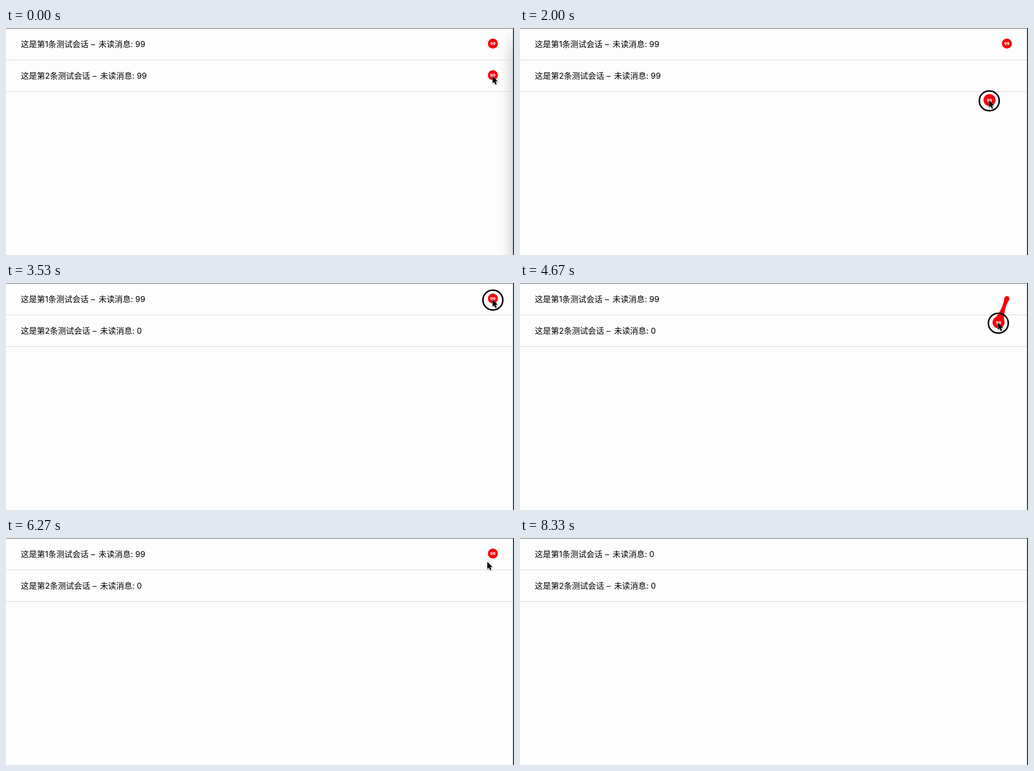
These frames come from a looping animation (1010x452 px, 8.59 s). An HTML page:

```html
<!DOCTYPE html>
<html lang="zh">
<head>
<meta charset="utf-8">
<style>
  html, body { margin: 0; width: 100%; height: 100%; overflow: hidden; background: #fdfdfd; }
  svg { display: block; }
  .title { font: 16px Inter, "Noto Sans CJK SC", "Noto Sans CJK", sans-serif; fill: #000; }
  .count { font: bold 9px "Open Sans", sans-serif; fill: #fff; text-anchor: middle; }
  .red { fill: #f6000a; }
  #cursor { filter: drop-shadow(0 1px 1px rgba(0, 0, 0, .4)); }
</style>
</head>
<body>
<svg width="1010" height="452" viewBox="0 0 1010 452">
  <defs>
    <linearGradient id="fade">
      <stop offset="0" stop-color="#000" stop-opacity="0"/>
      <stop offset=".5" stop-color="#000" stop-opacity=".025"/>
      <stop offset="1" stop-color="#000" stop-opacity=".12"/>
    </linearGradient>
    <linearGradient id="fadeTop" x2="0" y2="1">
      <stop offset="0" stop-color="#000"/>
      <stop offset=".12" stop-color="#fff"/>
    </linearGradient>
    <mask id="shadeMask"><rect x="970" width="40" height="452" fill="url(#fadeTop)"/></mask>
  </defs>
  <rect width="1010" height="452" fill="#fdfdfd"/>
  <rect id="shade" x="974" width="34" height="452" fill="url(#fade)" mask="url(#shadeMask)"/>
  <path d="M0 63.5H1008M0 126.5H1008" stroke="#d6d6d6"/>
  <path d="M0 .5H1010" stroke="#555"/>
  <rect x="1008" width="2" height="452" fill="#333"/>
  <g id="rows"></g>
  <circle id="ring" r="19.8" fill="none" stroke="#000" stroke-width="3"/>
  <path id="cursor" d="M-.5-1V13L2.7 10.2 5 15.4 7.4 14.4 5.2 9.3H9.6Z" fill="#000" stroke="#fff" stroke-width="1" paint-order="stroke"/>
</svg>
<script>
const LOOP = 8590, FPS = 15, SNAP = 60, HOME_X = 968;
const NS = "http://www.w3.org/2000/svg";
const $ = id => document.getElementById(id);

// Pointer path: step, x, y
const path = [
  [0, 968, 97], [4, 968, 97], [7, 962, 103], [10, 968, 98], [16, 969, 98], [18, 969, 98],
  [26, 945.5, 134.5], [30, 933, 145], [37, 831, 225.5], [42, 831, 225.5],
  [51, 968, 34], [53, 968, 34], [64, 951, 68], [70, 951, 80], [73, 946, 87], [76, 922, 70],
  [79, 926.5, 50], [81, 940, 50], [91, 957.5, 48.5], [94, 957.5, 48.5],
  [96, 968, 36], [100, 773, 160], [103, 976, 40], [105, 970, 34], [107, 981, 38],
  [109, 970, 34], [114, 930, 140], [121, 965, 400], [124, 974, 440], [125, 980, 475]
];

const rows = [
  { y: 31, shift: 0, drags: [[53, 80], [96, 104], [109, 114]] },
  { y: 94, shift: 3, drags: [[4, 10], [18, 42]] }
];

function add(parent, tag, attrs, text = "") {
  const el = document.createElementNS(NS, tag);
  for (const key in attrs) el.setAttribute(key, attrs[key]);
  el.textContent = text;
  return parent.appendChild(el);
}

rows.forEach((row, i) => {
  const label = (x, text) => add($("rows"), "text", { class: "title", x, y: row.y + 7 }, text);
  label(29.5, `这是第${i + 1}条测试会话`);
  label(169 + row.shift, "–");
  row.unread = label(184 + row.shift, "");
});
rows.forEach(row => {
  row.badge = add($("rows"), "g", {});
  row.tail = add(row.badge, "circle", { class: "red", cx: HOME_X, cy: row.y });
  row.neck = add(row.badge, "path", { class: "red" });
  row.dot = add(row.badge, "circle", { class: "red" });
  row.count = add(row.badge, "text", { class: "count" }, "99");
});

function pointer(step) {
  const next = path.findIndex(p => p[0] > step);
  if (next < 0) return path[path.length - 1].slice(1);
  const [s0, x0, y0] = path[next - 1], [s1, x1, y1] = path[next];
  const k = (step - s0) / (s1 - s0);
  return [x0 + (x1 - x0) * k, y0 + (y1 - y0) * k];
}

// Offset of the badge from its resting place while held at a step
function pull(row, step) {
  const [x, y] = pointer(step);
  return [x + .5 - HOME_X, y - 1.5 - row.y];
}

function badgeState(row, step) {
  const state = { dx: 0, dy: 0, held: false, popped: false };
  for (const [press, release] of row.drags) {
    if (step < press) continue;
    if (step < release) {
      [state.dx, state.dy] = pull(row, step);
      state.held = true;
      continue;
    }
    const [dx, dy] = pull(row, release - 1);
    if (press !== 96 && Math.hypot(dx, dy) > SNAP) state.popped = true;
    const age = step - release;
    const swing = age < 8 ? Math.exp(-.5 * age) * Math.cos(1.5 * age) : 0;
    state.dx = dx * swing;
    state.dy = dy * swing;
  }
  return state;
}

function neckPath(x0, y0, r0, x1, y1, r1) {
  const d = Math.hypot(x1 - x0, y1 - y0);
  const nx = -(y1 - y0) / d, ny = (x1 - x0) / d;
  const mid = `${(x0 + x1) / 2} ${(y0 + y1) / 2}`;
  const at = (x, y, r) => `${x + nx * r} ${y + ny * r}`;
  return `M${at(x0, y0, r0)}Q${mid} ${at(x1, y1, r1)}L${at(x1, y1, -r1)}Q${mid} ${at(x0, y0, -r0)}Z`;
}

function drawRow(row, step) {
  const s = badgeState(row, step);
  row.unread.textContent = `未读消息: ${s.popped ? 0 : 99}`;
  row.badge.setAttribute("visibility", s.popped ? "hidden" : "visible");
  const dist = Math.hypot(s.dx, s.dy), moved = dist > 4;
  const x = HOME_X + (moved ? s.dx : 0), y = row.y + (moved ? s.dy : 0);
  const r = moved ? 12 : 10;
  const linked = s.held && moved && dist < SNAP;
  const tailR = linked ? 10 - dist / 10 : 0;
  row.tail.setAttribute("r", tailR);
  row.neck.setAttribute("d", linked ? neckPath(HOME_X, row.y, tailR, x, y, r) : "");
  row.dot.setAttribute("cx", x);
  row.dot.setAttribute("cy", y);
  row.dot.setAttribute("r", r);
  row.count.setAttribute("x", x);
  row.count.setAttribute("y", y + 3.3);
}

function draw(time) {
  const step = Math.floor((time % LOOP + 4) * FPS / 1000);
  const [x, y] = pointer(step);
  const pressed = rows.some(row => row.drags.some(([a, b]) => step >= a && step < b));
  rows.forEach(row => drawRow(row, step));
  $("shade").setAttribute("opacity", Math.max(0, 1 - step / 4));
  $("ring").setAttribute("visibility", pressed ? "visible" : "hidden");
  for (const id of ["ring", "cursor"]) $(id).setAttribute("transform", `translate(${x} ${y})`);
}

const start = performance.now();
function tick() {
  draw(performance.now() - start);
  requestAnimationFrame(tick);
}
tick();
</script>
</body>
</html>
```
